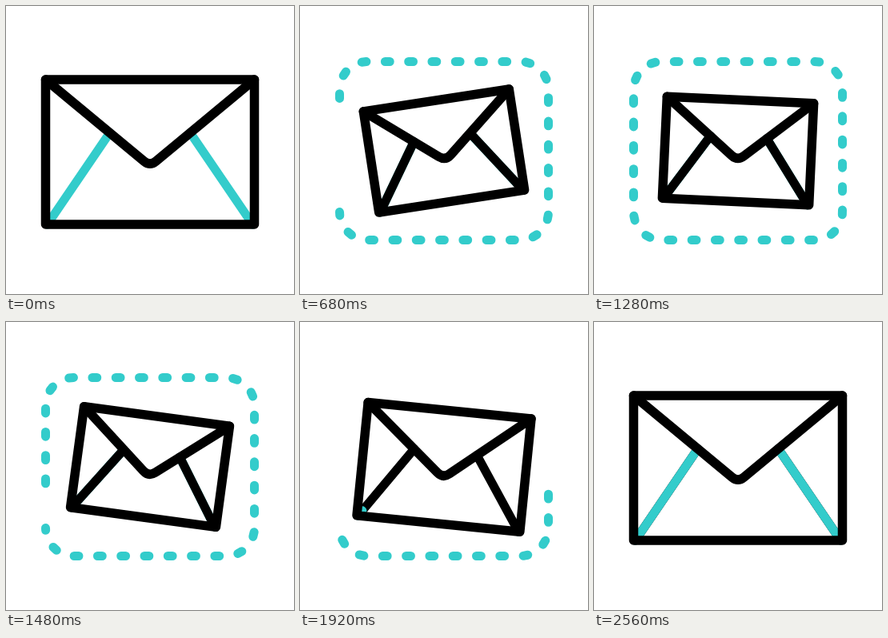
These frames come from a looping animation (360 px wide and 360 px high, 2.6 s). An HTML page:

```html
<!DOCTYPE html>
<html lang="en">
<head>
<meta charset="utf-8">
<title>Envelope</title>
<style>
  html, body { margin: 0; width: 100%; height: 100%; overflow: hidden; background: #fff; }
  svg { display: block; width: 100vw; height: 100vh; }
  path { fill: none; stroke: #000; stroke-width: 11.5; stroke-linecap: round; stroke-linejoin: round; }
  .thin { stroke-width: 11; }
  .teal { stroke: #33cccb; }
</style>
</head>
<body>
<svg viewBox="0 0 360 360">
  <path id="track" style="stroke:none" d="M49.5 257.5A35 35 0 0 0 84.5 292.5H275.5A35 35 0 0 0 310.5 257.5V104.5A35 35 0 0 0 275.5 69.5H84.5A35 35 0 0 0 49.5 104.5Z"/>
  <path id="dashes" class="thin teal"/>
  <path id="leftBase" class="thin"/>
  <path id="leftTop" class="thin"/>
  <path id="rightBase" class="thin"/>
  <path id="rightTop" class="thin"/>
  <path id="flap"/>
  <path id="body"/>
</svg>
<script>
const LOOP = 2600, TEAL = '#33cccb', BLACK = '#000';
const HALF_W = 130.5, HALF_H = 90.5;
const el = id => document.getElementById(id);
const track = el('track');
const trackLen = track.getTotalLength();
const DASHES = 31, DASH = 5.8, CRAWL = 0.1079;
const period = trackLen / DASHES;

const clamp = v => Math.min(1, Math.max(0, v));
const mix = (a, b, u) => a + (b - a) * u;
const inOut = (u, p) => u < 0.5 ? Math.pow(2 * u, p) / 2 : 1 - Math.pow(2 - 2 * u, p) / 2;
const ramp = (t, from, to, p = 3) => inOut(clamp((t - from) / (to - from)), p);
const xy = p => p.x.toFixed(2) + ' ' + p.y.toFixed(2);
const setPath = (id, d) => el(id).setAttribute('d', d);

// Stroke weight stays constant, so points are scaled rather than the group.
function poser(t) {
  const shrink = ramp(t, 120, 760);
  const grow = ramp(t, 1600, 2345, 4);
  const small = shrink - grow;
  const scale = 1 - 0.297 * small;
  const tilt = mix(-8.8 * shrink, 7.9, ramp(t, 880, 1580)) * (1 - grow);
  const a = tilt * Math.PI / 180;
  const c = Math.cos(a) * scale, s = Math.sin(a) * scale;
  const cy = 182.5 - 1.5 * small;
  return { scale, at: (x, y) => ({ x: 180 + x * c - y * s, y: cy + x * s + y * c }) };
}

function drawFold(name, side, pose, t, delay) {
  const turn = ramp(t, 120 + delay, 704 + delay);
  const back = ramp(t, 1762 + delay * 0.7, 2362 + delay * 0.7);
  const from = pose.at(side * (HALF_W - 2.2), HALF_H);
  const to = pose.at(side * 50.3, -24);
  const u = back > 0 ? back : turn;
  const end = { x: mix(from.x, to.x, u), y: mix(from.y, to.y, u) };
  setPath(name + 'Base', `M${xy(from)}L${xy(to)}`);
  setPath(name + 'Top', u > 0 ? `M${xy(from)}L${xy(end)}` : '');
  el(name + 'Base').style.stroke = back > 0 ? BLACK : TEAL;
  el(name + 'Top').style.stroke = back > 0 ? TEAL : BLACK;
}

function drawDashes(t) {
  const start = 16 * ramp(t, 1480, 2080);
  const end = trackLen * (ramp(t, 120, 960) - ramp(t, 1180, 2554));
  const shift = 4.8 + CRAWL * (t - 440);
  const phase = ((shift % period) + period) % period;
  let d = '';
  for (let i = -1; i <= DASHES; i++) {
    const mid = phase + i * period;
    const a = Math.max(start, mid - DASH / 2);
    const b = Math.min(end, mid + DASH / 2);
    if (b > a) d += `M${xy(track.getPointAtLength(a))}L${xy(track.getPointAtLength(b))}`;
  }
  setPath('dashes', d);
}

function draw(t) {
  const pose = poser(t);
  const p = (x, y) => xy(pose.at(x, y));
  const bx = 7.5 / pose.scale, by = 17.7 - 6.2 / pose.scale;
  setPath('body', `M${p(-HALF_W, -HALF_H)}L${p(HALF_W, -HALF_H)}L${p(HALF_W, HALF_H)}L${p(-HALF_W, HALF_H)}Z`);
  setPath('flap', `M${p(-HALF_W, -HALF_H)}L${p(-bx, by)}Q${p(0, 17.7)} ${p(bx, by)}L${p(HALF_W, -HALF_H)}`);
  drawFold('left', -1, pose, t, 0);
  drawFold('right', 1, pose, t, 100);
  drawDashes(t);
}

const began = performance.now();
function tick() {
  draw((performance.now() - began) % LOOP);
  requestAnimationFrame(tick);
}
tick();
</script>
</body>
</html>
```
